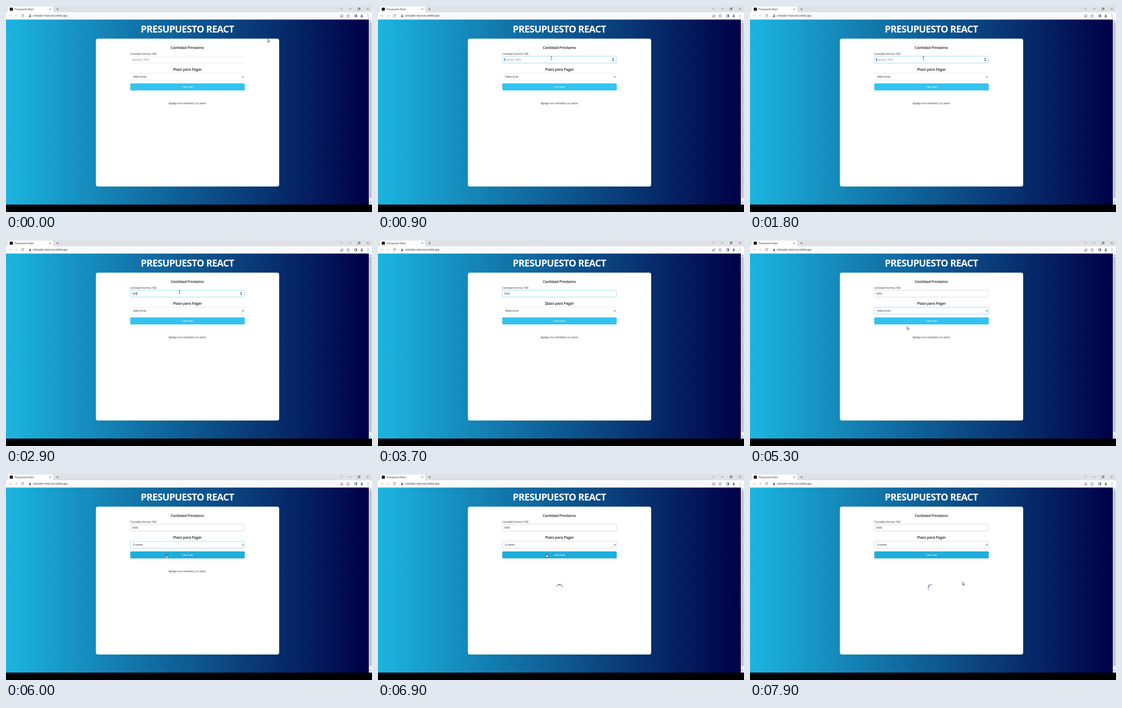
Animation, 690 px wide and 388 px high, one loop 8000 ms. Source, as an HTML page:

```html
<!DOCTYPE html>
<html lang="es">
<head>
<meta charset="utf-8">
<title>Presupuesto React</title>
<style>
  html, body { margin: 0; width: 690px; height: 388px; overflow: hidden; background: #000; }
  svg { display: block; }
  text { font-family: "Open Sans", "Noto Sans", sans-serif; font-size: 5px; letter-spacing: -.08px; fill: #333; }
  .mid { text-anchor: middle; }
  .title { font-size: 18px; font-weight: 700; letter-spacing: -.64px; fill: #fff; }
  .head { font-size: 7px; font-weight: 600; letter-spacing: -.13px; fill: #222; }
  .small { font-size: 4.4px; letter-spacing: -.1px; }
  .url { font-size: 5px; letter-spacing: -.11px; }
  .btn { font-size: 3.7px; font-weight: 600; letter-spacing: .2px; fill: #fff; }
  .line { fill: none; stroke: #5f6368; stroke-width: .8; }
</style>
</head>
<body>
<svg width="690" height="388" viewBox="0 0 690 388">
  <defs>
    <linearGradient id="sky"><stop stop-color="#1cb5e0"/><stop offset="1" stop-color="#000046"/></linearGradient>
  </defs>

  <!-- browser frame -->
  <rect width="690" height="26" fill="#fff"/>
  <rect width="690" height="12" fill="#dee1e6"/>
  <path d="M1 12Q3 12 3 10V3Q3 1 5 1H87Q89 1 89 3V10Q89 12 91 12Z" fill="#fff"/>
  <rect x="7" y="3" width="6" height="6" rx="1" fill="#20232a"/>
  <text class="small" x="16" y="7.8">Presupuesto React</text>
  <path class="line" d="M82 4.5l3 3m0-3l-3 3M95 6h4.4M97.2 3.8v4.4"/>
  <path class="line" d="M630.5 4.5l1.8 1.8 1.8-1.8M647 5.5h4M663.5 4.5h3v3h-3zM664.5 4.5v-1h3v3h-1M680 3.5l4 4m0-4l-4 4"/>
  <rect x="39" y="14" width="612" height="9.5" rx="4.7" fill="#f8f9fa"/>
  <path class="line" style="stroke:#bbb" d="M10.5 18.5H6m2-2l-2 2 2 2M16.5 18.5H21m-2-2l2 2-2 2"/>
  <path class="line" d="M33 17.2A2.2 2.2 0 1 0 33.2 19M33.3 16v1.6h-1.6"/>
  <path d="M43.7 18h3.4v2.8h-3.4z" fill="#5f6368"/>
  <path class="line" style="stroke-width:.6" d="M44.3 18v-.8a1.1 1.1 0 0 1 2.2 0v.8"/>
  <text class="url" x="50.5" y="20.3">cotizador-react-prj.netlify.app</text>
  <path class="line" d="M631 17v3.5h4V19M632.5 19q.3-2 2.5-2M634 16l1.2 1-1.2 1"/>
  <path class="line" style="stroke-width:.6" d="M645 15.8l.8 1.8 2 .2-1.5 1.3.4 2-1.7-1-1.7 1 .4-2-1.5-1.3 2-.2z"/>
  <path class="line" d="M657 16.5h4.4v4H657z"/><path d="M659.4 16.5h2v4h-2z" fill="#5f6368"/>
  <circle cx="670.7" cy="17.3" r="1.4" fill="#5f6368"/><path d="M668.2 21q0-2 2.5-2t2.5 2z" fill="#5f6368"/>
  <path d="M682 16h1v1h-1zm0 2h1v1h-1zm0 2h1v1h-1z" fill="#5f6368"/>

  <!-- page -->
  <rect y="25.5" width="684" height="348.5" fill="url(#sky)"/>
  <rect x="684" y="25.5" width="6" height="348.5" fill="#f1f1f1"/>
  <rect x="684.7" y="31.5" width="4.6" height="330" fill="#c1c1c1"/>
  <path d="M685.5 29.5l1.5-1.7 1.5 1.7zM685.5 369.5l1.5 1.7 1.5-1.7z" fill="#555"/>
  <text class="title mid" x="342" y="50.3">PRESUPUESTO REACT</text>
  <rect x="169.5" y="61.5" width="345.5" height="278.5" rx="4" fill="#fff"/>

  <text class="head mid" x="342" y="80.8">Cantidad Prestamo</text>
  <text x="234" y="92">Cantidad minima: 500</text>
  <g id="amountBox"></g>
  <text id="amount" x="238" y="103"></text>
  <path id="caret" stroke="#111" stroke-width=".7"/>
  <path id="steps" d="M441.3 100.1l2-2.2 2 2.2zM441.3 101.7l2 2.2 2-2.2z" fill="#444"/>

  <text class="head mid" x="342" y="121.8">Plazo para Pagar</text>
  <g id="termBox"></g>
  <text id="term" x="239.5" y="135.3"></text>
  <path d="M444.8 132.5l1.7 1.7 1.7-1.7" fill="none" stroke="#222" stroke-width="1"/>

  <rect id="button" x="234.3" y="145.7" width="215.7" height="13.4" rx="1.5"/>
  <text class="btn mid" x="342.2" y="153.9">CALCULAR</text>
  <text id="hint" class="mid" x="342" y="185.2">Agrega una cantidad y un plazo.</text>
  <g id="spinner" fill="#211c85" transform="translate(342 214.5)"></g>

  <!-- pointers -->
  <g id="arrow"><path d="M0 0V6L1.4 4.8 2.4 7 3.4 6.5 2.4 4.4H4.2Z" fill="#fff" stroke="#222" stroke-width=".6"/></g>
  <g id="beam"><path d="M-1.4-3H1.4M0-3V3M-1.4 3H1.4" stroke="#444" stroke-width=".7"/></g>
  <g id="hand"><path d="M-1.4 3.4L-3 .8Q-2.7 0-1.5.9V-3Q-.8-4-.1-3V-.6L2.4 0Q3 .3 2.8 1.2L2.2 3.4Z" fill="#fff" stroke="#111" stroke-width=".7"/></g>
</svg>
<script>
const LOOP = 8000, FRAME = 100;
const el = id => document.getElementById(id);
const show = (id, on) => el(id).setAttribute('visibility', on ? 'visible' : 'hidden');

// time, x, y of the pointer's hot spot
const path = [
  [0, 493, 62], [600, 327, 98], [3200, 327, 98], [3700, 316, 116],
  [4300, 304, 142], [4600, 300, 135], [4800, 300, 135], [5300, 296, 162.5],
  [5800, 294, 156], [6300, 318.5, 153.3], [7100, 318.5, 153.3], [7900, 400.5, 203]
];
const typed = [[0, ''], [2400, '5'], [2600, '50'], [2800, '500'], [3000, '5000']];

const focusAt = 700, blurAt = 4000, openAt = 4700, pickAt = 5800, clickAt = 6500;

const ease = p => p * p * (3 - 2 * p);
const last = (table, t) => table.filter(row => row[0] <= t).pop();

function pointer(t) {
  const i = path.findIndex(row => row[0] > t);
  if (i < 0) return path[path.length - 1].slice(1);
  const [t0, x0, y0] = path[i - 1], [t1, x1, y1] = path[i];
  const p = ease((t - t0) / (t1 - t0));
  return [x0 + (x1 - x0) * p, y0 + (y1 - y0) * p];
}

// Untouched fields show only faint dashed edges above and below.
function field(id, y, state) {
  const left = 234.5, right = 449.5, bottom = y + 13;
  el(id).innerHTML = state === 'idle'
    ? `<path d="M${left} ${y}H${right}M${left} ${bottom}H${right}" stroke="#d9d9d9" stroke-width=".7" stroke-dasharray="2 1"/>`
    : `<rect x="${left}" y="${y}" width="${right - left}" height="13" rx="1.2" fill="#fff"
        stroke="${state === 'focus' ? '#8fd3ee' : '#d4d4d4'}" stroke-width=".8"/>`;
}

const dots = Array.from({ length: 12 }, (_, i) => {
  const dot = document.createElementNS('http://www.w3.org/2000/svg', 'circle');
  const a = i * Math.PI / 6;
  dot.setAttribute('cx', 6.1 * Math.sin(a));
  dot.setAttribute('cy', -6.1 * Math.cos(a));
  el('spinner').append(dot);
  return dot;
});

function spin(t) {
  dots.forEach((dot, i) => {
    const phase = ((t - 6400 - i * 100) / 1200 % 1 + 1) % 1;
    const size = Math.max(0, 1 - Math.abs(phase - .4) / .4);
    dot.setAttribute('r', 1.08 * ease(size));
  });
}

function draw(t) {
  const [x, y] = pointer(t);
  const inX = x > 234 && x < 450;
  const overAmount = inX && y > 94 && y < 108;
  const overButton = inX && y > 146 && y < 159 && t > pickAt;
  const kind = overAmount ? 'beam' : overButton ? 'hand' : 'arrow';
  for (const id of ['arrow', 'beam', 'hand']) show(id, id === kind);
  el(kind).setAttribute('transform', `translate(${x} ${y})`);

  const focused = t >= focusAt && t < blurAt;
  const [keyAt, value] = last(typed, t);
  field('amountBox', 94.5, focused ? 'focus' : t < focusAt ? 'idle' : 'done');
  const amount = el('amount');
  amount.textContent = value || 'Ejemplo: 5000';
  amount.style.fill = value ? '#333' : '#858585';
  const caretX = 238.3 + (value ? amount.getComputedTextLength() : 0);
  el('caret').setAttribute('d', `M${caretX} 98V104`);
  show('caret', focused && (t - Math.max(keyAt, focusAt)) % 1000 < 500);
  show('steps', overAmount);

  field('termBox', 126.7, t < openAt ? 'idle' : t < clickAt ? 'focus' : 'done');
  el('term').textContent = t < pickAt ? 'Seleccionar' : '6 meses';

  const clicked = t >= clickAt;
  el('button').setAttribute('fill', overButton || clicked ? '#1eaedb' : '#33c3f0');
  show('hint', !clicked);
  show('spinner', clicked);
  spin(t);
}

const start = performance.now();
function tick() {
  const t = (performance.now() - start) % LOOP;
  draw(Math.floor(t / FRAME) * FRAME);
  requestAnimationFrame(tick);
}
tick();
</script>
</body>
</html>
```
